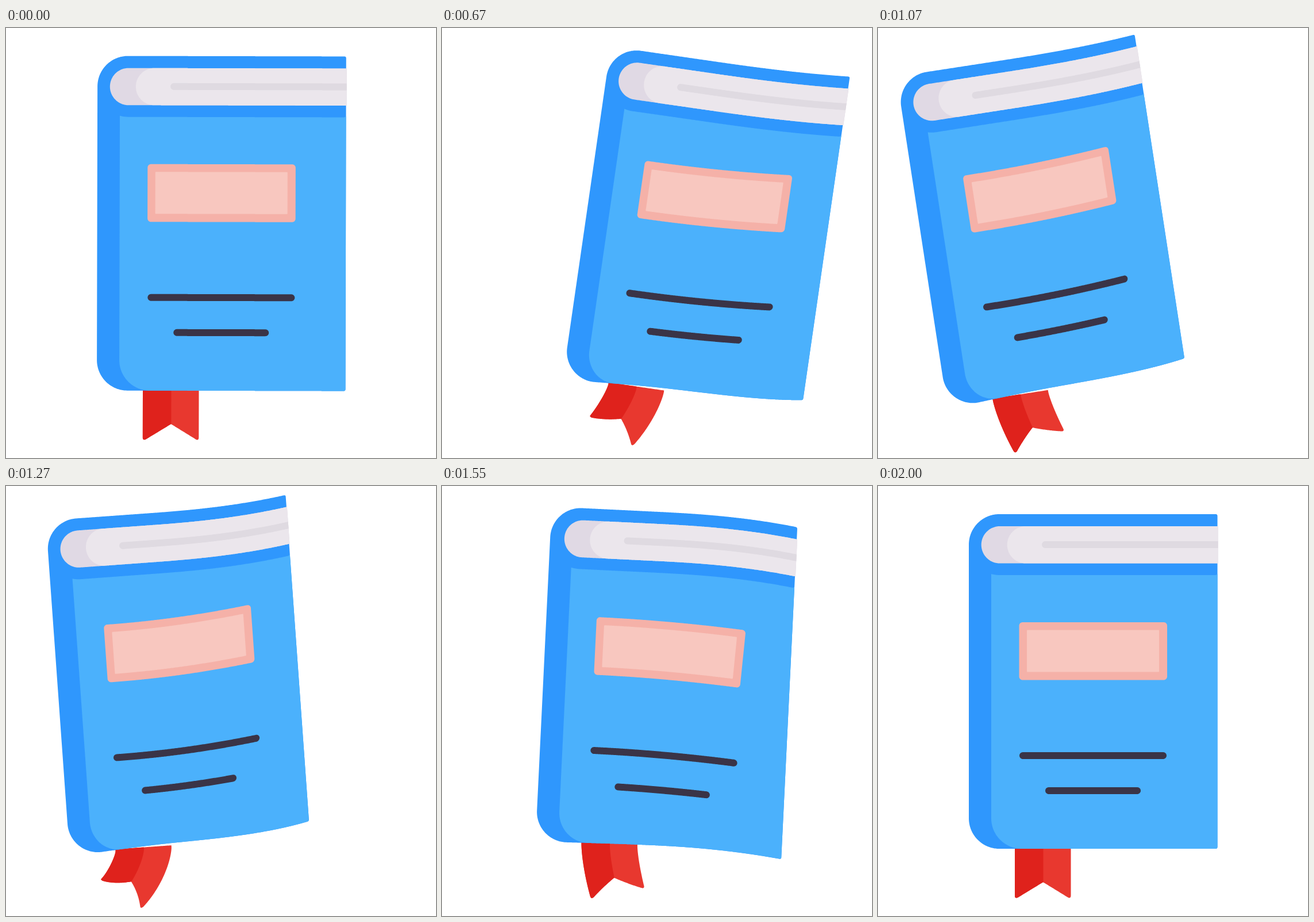
Write an HTML page with a canvas that moves like this. It is 748 px wide and 748 px high and loops after 2020 ms.

```html
<!DOCTYPE html>
<html lang="en">
<head>
<meta charset="utf-8">
<title>Swaying book</title>
<style>
  html, body { margin: 0; width: 100%; height: 100%; overflow: hidden; background: #fff; }
  canvas { display: block; width: 100vmin; height: 100vmin; }
</style>
</head>
<body>
<canvas id="stage" width="748" height="748"></canvas>
<script>
const ctx = document.getElementById('stage').getContext('2d');
const LOOP = 2020, HOLD = 520, READY = 490;
const PIVOT = { x: 374, y: 631 };
const SPINE = 211, EDGE = 590;

// Turning points [time, value] of each part of the swing
const swing = {
  tilt: [[470, 0], [760, 10.5], [1090, -8.9], [1500, 2.85], [2000, 0]],
  slide: [[510, 0], [666, 50], [1205, -55], [1496, 4.5], [2000, 0]],
  bob: [[500, 0], [780, 12], [1150, -6], [2000, 0]],
  bend: [[500, 0], [620, -15], [820, 34], [1175, -20], [1550, 15], [2000, 0]],
  flap: [[500, 0], [640, -.8], [940, 1.15], [1290, -1.05], [1620, .6], [2000, 0]]
};

const ease = u => (1 - Math.cos(Math.PI * u)) / 2;

function wave(t, keys) {
  const next = keys.findIndex(([time]) => time > t);
  if (next === 0) return keys[0][1];
  if (next < 0) return keys[keys.length - 1][1];
  const [t0, v0] = keys[next - 1], [t1, v1] = keys[next];
  return v0 + (v1 - v0) * ease((t - t0) / (t1 - t0));
}

function poseAt(t) {
  const time = t < HOLD ? READY : t;
  const pose = {};
  for (const part in swing) pose[part] = wave(time, swing[part]);
  pose.squeeze = 1.9 * Math.sqrt(Math.abs(pose.slide));
  return pose;
}

// Each warp bends a point of the upright book
function cover([x, y], { bend, squeeze }) {
  const depth = ((y - 49) / 582) ** 2;
  const s = Math.max(0, (x - SPINE) / (EDGE - SPINE));
  const curl = Math.max(0, (x - 340) / 250) ** 2.5;
  const lift = .6 * squeeze * depth * Math.sin(Math.PI * s);
  return [x - squeeze * s, y + (bend - squeeze * depth) * curl - lift];
}

function pages([x, y], pose) {
  const push = .2 * Math.max(0, pose.bend) * (EDGE - x) / 410;
  return cover([x + push, y], pose);
}

const print = midY => ([x, y], { bend, squeeze }) => {
  const s = Math.max(0, x - 250) / 252;
  const sag = .8 * (bend - squeeze / 2);
  const turn = 1.3 * Math.max(0, sag) * s / 252;
  return [x - turn * (y - midY), y + sag * s * s];
};

function ribbon([x, y], { flap }) {
  const w = Math.max(0, y - 631) / 85, u = x - 287;
  return [
    287 + u * (1 - .28 * (flap * w) ** 2) + 42.5 * flap * w ** 1.4,
    y - 9.4 * flap ** 2 * w ** 3 - .544 * flap * u * w
  ];
}

function shape(color, warp, d) {
  const path = document.createElementNS('http://www.w3.org/2000/svg', 'path');
  path.setAttribute('d', d);
  const length = path.getTotalLength(), count = Math.ceil(length / 1.5);
  const points = Array.from({ length: count }, (_, i) => {
    const p = path.getPointAtLength(length * i / count);
    return [p.x, p.y];
  });
  return { color, warp, points };
}

const box = (x, y, w, h, r) =>
  `M${x + r} ${y}h${w - 2 * r}a${r} ${r} 0 0 1 ${r} ${r}v${h - 2 * r}a${r} ${r} 0 0 1 ${-r} ${r}` +
  `h${2 * r - w}a${r} ${r} 0 0 1 ${-r} ${-r}v${2 * r - h}a${r} ${r} 0 0 1 ${r} ${-r}Z`;

// Bar with a round left end that runs to the cover's edge
const bar = (x, y, h) => `M591.5 ${y}H${x}a${h / 2} ${h / 2} 0 0 0 0 ${h}H591.5Z`;

const shapes = [
  shape('#e8382f', ribbon, 'M238 628H335.5V713Q335 718 331 716L287 689L243 716Q238 718 238 713Z'),
  shape('#df221c', ribbon, 'M238 628H287.5V689L243 716Q238 718 238 713Z'),
  shape('#2f97fd', cover, 'M587.5 49H211A53 53 0 0 0 158 102V578A53 53 0 0 0 211 631H587.5Q590.5 631 590.5 628V52Q590.5 49 587.5 49Z'),
  shape('#4bb1fc', cover, 'M197 153Q204 155 212 155H588L590.5 153V628Q590.5 631 587.5 631H250A53 53 0 0 1 197 578Z'),
  shape('#e0d9e4', pages, bar(212, 70, 64.6)),
  shape('#ebe6ec', pages, bar(257, 70, 64.6)),
  shape('#dfdae1', pages, bar(291, 96, 12)),
  shape('#f5b1a8', print(287), box(245.5, 237, 257.5, 100.5, 6)),
  shape('#f8c7bf', print(287), box(259, 250.5, 230, 73, .5)),
  shape('#3a3447', print(469), box(246, 463, 256, 12, 6)),
  shape('#3a3447', print(530), box(291, 524, 166, 12, 6))
];

function draw(t) {
  const pose = poseAt(t);
  ctx.clearRect(0, 0, 748, 748);
  ctx.save();
  ctx.translate(PIVOT.x + pose.slide, PIVOT.y + pose.bob);
  ctx.rotate(pose.tilt * Math.PI / 180);
  ctx.translate(-PIVOT.x, -PIVOT.y);
  for (const { color, warp, points } of shapes) {
    ctx.beginPath();
    for (const p of points) ctx.lineTo(...warp(p, pose));
    ctx.fillStyle = color;
    ctx.fill();
  }
  ctx.restore();
}

const begin = performance.now();
function tick() {
  draw((performance.now() - begin) % LOOP);
  requestAnimationFrame(tick);
}
tick();
</script>
</body>
</html>
```
